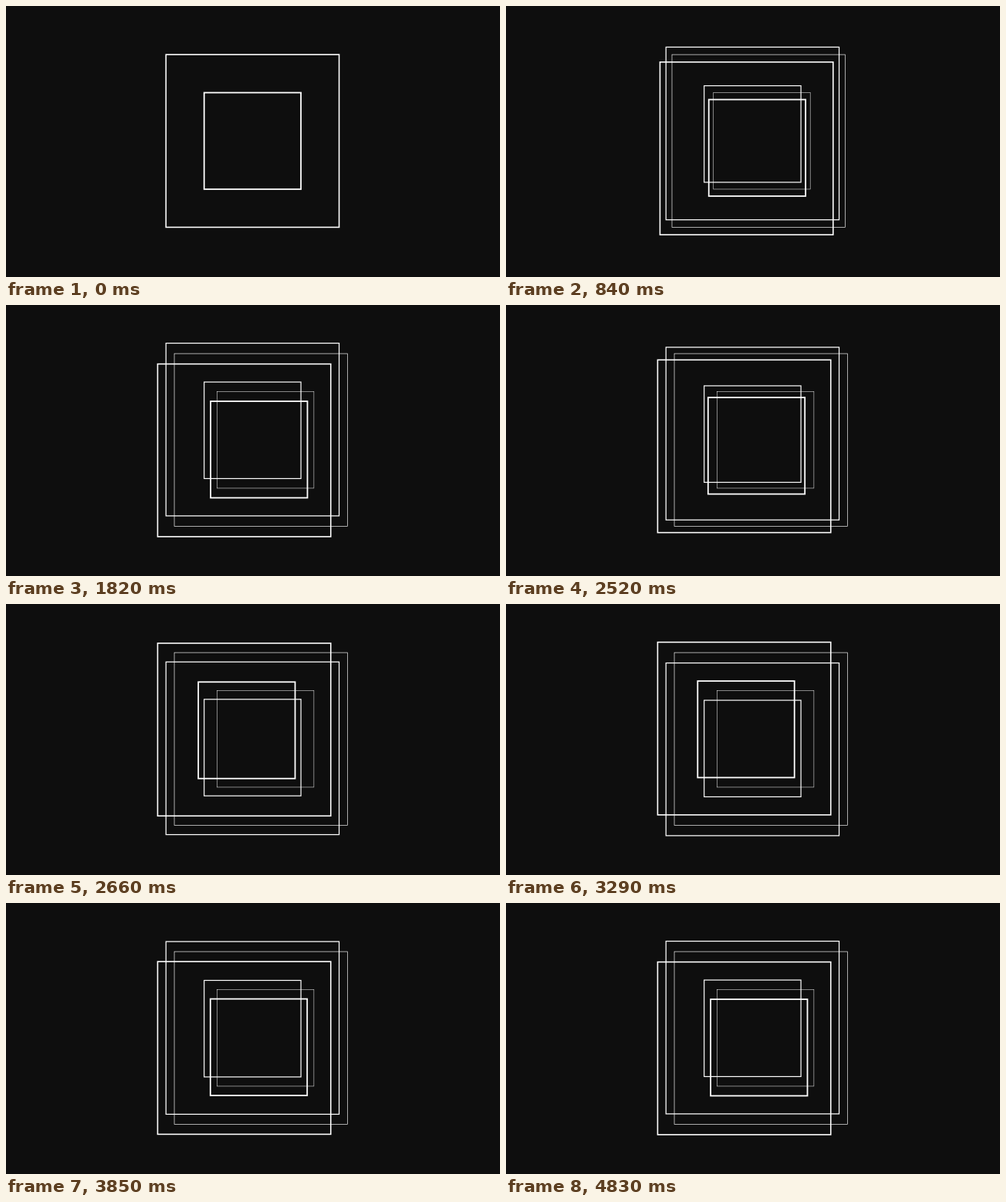
An HTML page with a canvas for the animation above (5.04 s loop, 640x352 px).

```html
<!DOCTYPE html>
<html lang="en">
<head>
<meta charset="utf-8">
<title>Nested squares</title>
<style>
html, body { margin: 0; height: 100%; overflow: hidden; background: #0e0e0e; }
canvas { display: block; }
</style>
</head>
<body>
<canvas width="640" height="352"></canvas>
<script>
const ctx = document.querySelector('canvas').getContext('2d');
const LOOP = 5040, STEP = 70, EASE = 350;
const OPEN = 776, SWAP = 2509, BACK = 3649;
const CX = 319.4, CY = 175.25;

// x and y are offsets in units of the group's spread; flip is x after the swap
const groups = [
  { size: 224.3, dx: 10.8, dy: 13.5, layers: [
    { x: 1, y: 0, flip: 1, width: 0.65 },
    { x: 0, y: -1, flip: 0, width: 1.25 },
    { x: -1, y: 1, flip: -1, width: 1.6 }
  ] },
  { size: 125.4, dx: 8.4, dy: 12.5, layers: [
    { x: 2, y: 0, flip: 2, width: 0.5 },
    { x: 0, y: -1, flip: 0, width: 1.2 },
    { x: 1, y: 1, flip: -1, width: 1.8 }
  ] }
];

function expoOut(ms) {
  const p = Math.min(1, Math.max(0, ms / EASE));
  return p === 1 ? 1 : 1 - 2 ** (-10 * p);
}

function draw(time) {
  const open = expoOut(time - OPEN);
  const swap = expoOut(time - SWAP) - expoOut(time - BACK);
  ctx.fillStyle = '#0e0e0e';
  ctx.fillRect(0, 0, 640, 352);
  ctx.strokeStyle = '#fff';
  for (const g of groups) {
    for (const l of g.layers) {
      // Squares that coincide read as a single line
      if (open === 0 && l !== g.layers[2]) continue;
      const x = CX - g.size / 2 + g.dx * open * (l.x + (l.flip - l.x) * swap);
      const y = CY - g.size / 2 + g.dy * open * l.y * (1 - 2 * swap);
      ctx.lineWidth = l.width;
      ctx.strokeRect(x, y, g.size, g.size);
    }
  }
}

const start = performance.now();
function tick() {
  const time = (performance.now() - start) % LOOP;
  draw(Math.floor(time / STEP) * STEP);
  requestAnimationFrame(tick);
}
tick();
</script>
</body>
</html>
```
